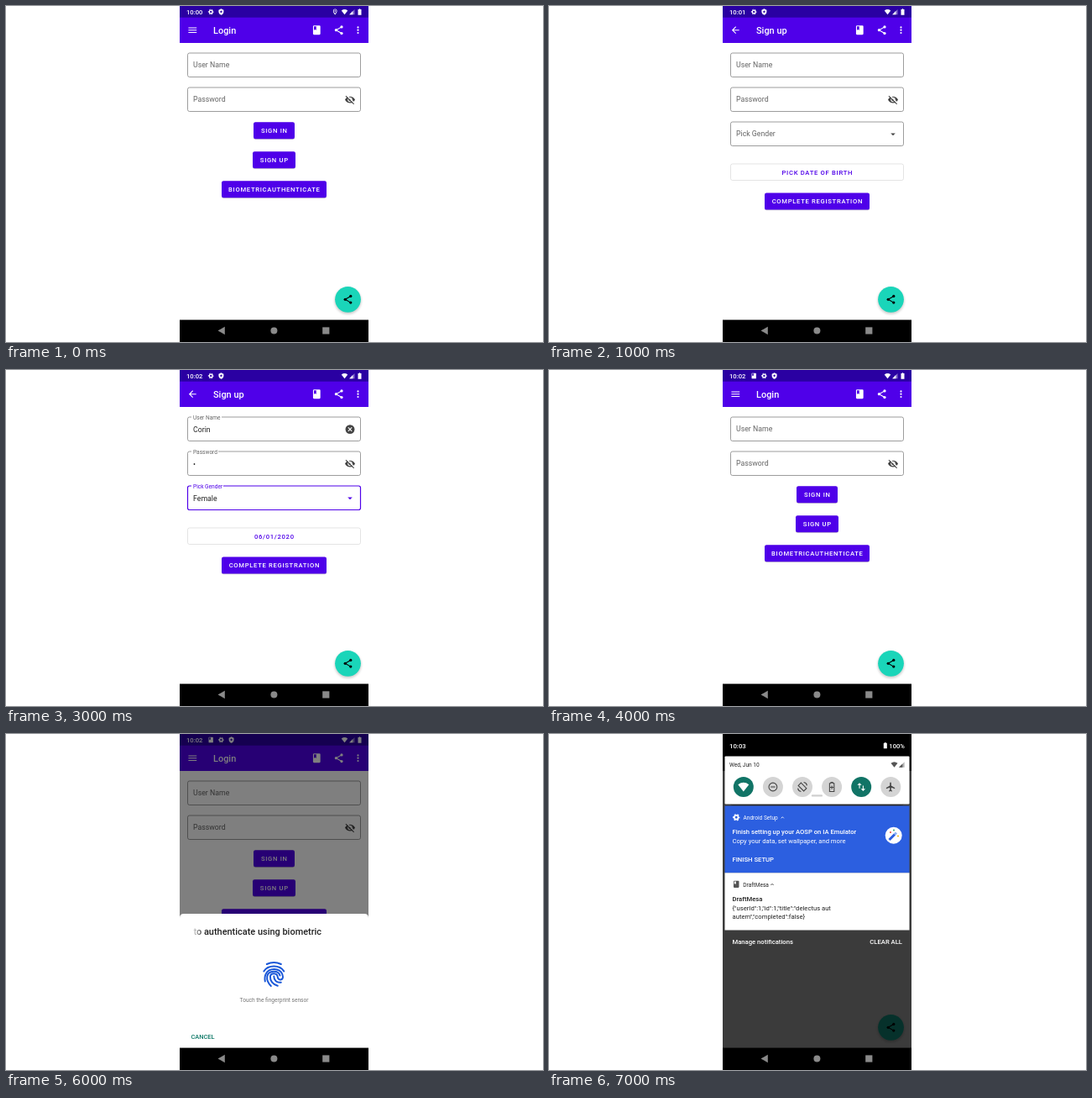
These frames come from a looping animation (640x400 px, 8000 ms). An HTML page:

```html
<!DOCTYPE html>
<html lang="en">
<head>
<meta charset="utf-8">
<title>App walkthrough</title>
<style>
html, body { margin: 0; width: 100%; height: 100%; overflow: hidden; background: #fff; }
svg { display: block; width: 100vw; height: 100vh; font-family: Roboto, sans-serif; }
text { white-space: pre; }
</style>
</head>
<body>
<svg id="stage" viewBox="0 0 640 400"></svg>
<script>
const PURPLE = '#4f00e9', DARK = '#2a00a2', TEAL = '#1ad5b9', GREEN = '#0c7866';
const INK = '#222', GREY = '#666';
const USER = 'Corin', APP = 'DraftMesa';
const stage = document.getElementById('stage');

// Icons live in a 24 x 24 box and use currentColor.
const ICONS = {
  menu: '<path d="M3 6h18v2H3zM3 11h18v2H3zM3 16h18v2H3z"/>',
  back: '<path d="M20 11H7.8l5.6-5.6L12 4l-8 8 8 8 1.4-1.4L7.8 13H20z"/>',
  book: '<path fill-rule="evenodd" d="M6 2h12q2 0 2 2v16q0 2-2 2H6q-2 0-2-2V4q0-2 2-2zM6 4v8l2.5-1.5L11 12V4z"/>',
  share: '<path d="M18 5L6 12l12 7" fill="none" stroke="currentColor" stroke-width="2"/><circle cx="18" cy="5" r="3"/><circle cx="6" cy="12" r="3"/><circle cx="18" cy="19" r="3"/>',
  more: '<circle cx="12" cy="6" r="2"/><circle cx="12" cy="12" r="2"/><circle cx="12" cy="18" r="2"/>',
  gear: '<g fill="none" stroke="currentColor"><circle cx="12" cy="12" r="5.6" stroke-width="4.2"/><circle cx="12" cy="12" r="8.6" stroke-width="3" pathLength="12" stroke-dasharray="1.1 .9" stroke-dashoffset=".55"/></g>',
  shield: '<path fill-rule="evenodd" d="M12 1l9 4v6c0 6-4 10-9 12-5-2-9-6-9-12V5zM12 6l-1.5 4H7l3 2.500-1 4 3-2.300 3 2.300-1-4 3-2.500h-3.500z"/>',
  pin: '<path fill-rule="evenodd" d="M12 1C7.500 1 4.500 4.500 4.500 8.500 4.500 14 12 23 12 23s7.500-9 7.500-14.500C19.500 4.500 16.500 1 12 1zM12 3.500c3 0 5 2 5 5 0 3-3 7-5 10-2-3-5-7-5-10 0-3 2-5 5-5z"/><circle cx="12" cy="8.500" r="2.500"/>',
  wifi: '<path d="M12 22L0 7Q12-2 24 7z"/>',
  signal: '<path d="M2 22L22 2v20z" opacity=".45"/><path d="M2 22L15 9v13z"/>',
  battery: '<path d="M10 1h4v2h4v20H6V3h4z"/>',
  eyeOff: '<path fill-rule="evenodd" d="M1 12C5 2.500 19 2.500 23 12 19 21.500 5 21.500 1 12zM7 12a5 5 0 0 0 10 0 5 5 0 0 0-10 0z"/><circle cx="12" cy="12" r="3"/><path d="M4.500 2.200L22.500 20.200" stroke="#fff" stroke-width="2.400"/><path d="M2.700 3.700L20.500 21.500" stroke="currentColor" stroke-width="1.900"/>',
  clear: '<circle cx="12" cy="12" r="10"/><path d="M8 8l8 8M16 8l-8 8" stroke="#fff" stroke-width="2"/>',
  down: '<path d="M7 10l5 5 5-5z"/>',
  edit: '<path d="M3 17.200V21h3.800L17.800 9.900l-3.700-3.700zM20.700 7c.4-.4.4-1 0-1.400l-2.300-2.300c-.4-.4-1-.4-1.400 0l-1.800 1.800 3.700 3.700z"/>',
  left: '<path d="M15 6l-6 6 6 6" fill="none" stroke="currentColor" stroke-width="2.400"/>',
  right: '<path d="M9 6l6 6-6 6" fill="none" stroke="currentColor" stroke-width="2.400"/>',
  up: '<path d="M6 15l6-6 6 6" fill="none" stroke="currentColor" stroke-width="3"/>',
  dnd: '<circle cx="12" cy="12" r="9" fill="none" stroke="currentColor" stroke-width="2"/><path d="M7 11h10v2H7z"/>',
  rotate: '<g fill="none" stroke="currentColor" stroke-width="2"><path d="M9 3l12 12-6 6L3 9zM15 2q6 1 7 7M9 22q-6-1-7-7"/></g>',
  saver: '<path d="M10 2h4v2h3v18H7V4h3z" fill="none" stroke="currentColor" stroke-width="2"/><path d="M11 9h2v3h3v2h-3v3h-2v-3H8v-2h3z"/>',
  data: '<path d="M8 3l5 5H9v7H7V8H3zM16 21l-5-5h4V9h2v7h4z"/>',
  plane: '<path d="M21 16v-2l-8-5V3.500a1.500 1.500 0 0 0-3 0V9l-8 5v2l8-2.500V19l-2 1.500V22l3.500-1 3.500 1v-1.500L13 19v-5.500z"/>'
};

const icon = (name, cx, cy, size, color) =>
  `<g transform="translate(${cx - size / 2} ${cy - size / 2}) scale(${size / 24})" fill="${color}" color="${color}">${ICONS[name]}</g>`;

const rect = (x, y, w, h, fill, r = 0, extra = '') =>
  `<rect x="${x}" y="${y}" width="${w}" height="${h}" rx="${r}" fill="${fill}" ${extra}/>`;

const disc = (cx, cy, r, fill, extra = '') =>
  `<circle cx="${cx}" cy="${cy}" r="${r}" fill="${fill}" ${extra}/>`;

function text(str, x, y, size, fill, { w = 400, at = 'start', ls = 0 } = {}) {
  return `<text x="${x}" y="${y}" font-size="${size}" fill="${fill}" font-weight="${w}" text-anchor="${at}" letter-spacing="${ls}">${str}</text>`;
}

const caps = (str, x, y, fill, at = 'middle') =>
  text(str, x + (at === 'middle' ? .34 : 0), y, 7.66, fill, { w: 500, at, ls: .68 });

function statusIcons({ clock, note, pin }) {
  const left = [...(note ? ['book'] : []), 'gear', 'shield'];
  return text(clock, 215, 10, 7.66, '#fff', { w: 500 }) +
    left.map((n, i) => icon(n, 244.2 + i * 12.2, 7, 8, '#fff')).join('') +
    (pin ? icon('pin', 392.2, 7, 7.5, '#fff') : '') +
    icon('wifi', 403.5, 7, 7.5, '#fff') +
    icon('signal', 412.3, 7, 7.5, '#fff') +
    icon('battery', 421.5, 7, 8, '#fff');
}

function appBar(title, nav) {
  return rect(207, 0, 225, 14, DARK) + rect(207, 13.7, 225, 30.3, PURPLE) +
    icon(nav, 222.300, 28.700, 13.1, '#fff') +
    text(title, 247, 33, 10.95, '#fff', { w: 500 }) +
    icon('book', 370.3, 28.700, 13.1, '#fff') +
    icon('share', 396.7, 28.700, 13.1, '#fff') +
    icon('more', 419.5, 28.700, 13.1, '#fff');
}

function field(y, label, value, trail, focus, labelWidth) {
  const line = focus || '#858585';
  let out = rect(216.5, y, 206, 28.5, '#fff', 2.2, `stroke="${line}" stroke-width="${focus ? 1.2 : .8}"`);
  if (value) {
    out += rect(221, y - 1, labelWidth, 2, '#fff') +
      text(label, 223, y + 2.9, 6.57, focus ? PURPLE : GREY) +
      text(value, 223, y + 17.7, 8.76, INK);
  } else {
    out += text(label, 223, y + 17.4, 8.76, GREY);
  }
  return out + (trail ? icon(trail, 410, y + 14.6, 13.1, focus && trail === 'down' ? focus : '#444') : '');
}

function button(label, x, y, w, on = true) {
  return (on ? rect(x, y + .5, w, 20.2, '#000', 2.2, 'opacity=".2"') : '') +
    rect(x, y, w, 20, on ? PURPLE : '#d9d9d9', 2.2) +
    caps(label, x + w / 2, y + 12.8, on ? '#fff' : '#888');
}

function fab() {
  return disc(407.5, 351, 15.8, '#000', 'opacity=".2" filter="url(#soft)"') +
    disc(407.5, 349.3, 15.4, TEAL) + icon('share', 407.5, 349.3, 13.1, '#000');
}

function loginPage({ user, pass, bio }) {
  return appBar('Login', 'menu') +
    field(56, 'User Name', user, user && 'clear', null, 36) +
    field(97, 'Password', pass, 'eyeOff', pass && '#2470c2', 32) +
    button('SIGN IN', 295, 138.2, 49) +
    button('SIGN UP', 294, 173.2, 51) +
    button('BIOMETRICAUTHENTICATE', 257, 208.2, 125, bio) + fab();
}

function signUpPage({ user, pass, gender, date }) {
  return appBar('Sign up', 'back') +
    field(56, 'User Name', user, user && 'clear', null, 36) +
    field(97, 'Password', pass, 'eyeOff', null, 32) +
    field(138, 'Pick Gender', gender, 'down', gender && PURPLE, 38) +
    rect(216.5, 188, 206, 19.5, '#fff', 2.2, 'stroke="#d8d8d8" stroke-width=".7"') +
    caps(date, 319.5, 200.7, PURPLE) +
    button('COMPLETE REGISTRATION', 257, 222.6, 125) + fab();
}

const scrim = a => rect(207, 0, 225, 374, '#000', 0, `opacity="${a}"`);

function navBar() {
  return rect(207, 373.6, 225, 26.4, '#000') +
    '<path d="M252.500 386.500l8.300-4.700v9.400z" fill="#8a8a8a"/>' +
    disc(319.4, 386.5, 4, '#8a8a8a') + rect(377.2, 382.4, 8.2, 8.2, '#8a8a8a');
}

function datePicker() {
  const col = i => 248 + i * 23.67, row = i => 185 + i * 21.85;
  let out = rect(230.5, 55, 178, 280, '#000', 2, 'opacity=".35" filter="url(#soft)"') +
    rect(230.5, 53.7, 178, 279.8, '#fff', 2) +
    rect(230.5, 53.7, 178, 8, PURPLE, 2) + rect(230.5, 56, 178, 63, PURPLE) +
    text('PICK DATE OF BIRTH', 244, 69, 5.47, '#fff', { ls: .91 }) +
    text('Jun 1, 2020', 243.7, 108.2, 18.6, '#fff', { ls: .13 }) +
    icon('edit', 389, 101.5, 13.1, '#fff') +
    caps('JUNE, 2020', 241.7, 137, PURPLE, 'start') +
    icon('down', 296.7, 134.2, 13.1, PURPLE) +
    icon('left', 360.5, 134.2, 13.1, PURPLE) + icon('right', 386.5, 134.2, 13.1, PURPLE) +
    disc(271.6, 182.6, 10, PURPLE) +
    disc(342.6, 204.4, 9.8, 'none', 'stroke="#222" stroke-width=".9"');
  [...'SMTWTFS'].forEach((d, i) => {
    out += text(d, col(i), 163.5, 7.1, INK, { at: 'middle' });
  });
  for (let d = 1; d <= 30; d++) {
    out += text(d, col(d % 7), row(Math.floor(d / 7)), 6.57, d === 1 ? '#fff' : INK, { at: 'middle', ls: .1 });
  }
  return out + caps('CANCEL', 344, 322, PURPLE) + caps('OK', 386.500, 322, PURPLE);
}

function fingerprint() {
  return `<g transform="translate(319.3 286)" fill="none" stroke="#1b58d8" stroke-width="2" stroke-linecap="round">
    <path d="M-8.500-12Q0-16 8.500-12M-12-3.500C-7-11.500 7-11.500 12-3.500"/>
    <path d="M-10.500 8.500Q-11.500 3-9.500-.500C-6-8 7-8 10 0Q11 3 10.500 4.500C9 8 4.600 6.500 4.400 3 4-1.800-3.600-2.200-4.400 2.400-4.800 8-1 12.500 4.500 13.800"/>
    <path d="M-3.500 14C-7 10.500-8.500 6-8 2.500-6.500-5 5.500-5 7.200 1.500M0 2.600C0 7.600 3.500 10.500 8.500 9.700"/></g>`;
}

function bioSheet() {
  return '<path d="M207 374V219q0-5 5-5h215q5 0 5 5v155z" fill="#fff"/>' +
    text('to authenticate using biometric', 223.5, 239, 10.95, 'url(#fade)', { w: 500 }) +
    fingerprint() +
    text('Touch the fingerprint sensor', 319.5, 319.300, 6.57, '#777', { at: 'middle' }) +
    text('CANCEL', 220.5, 363, 7.4, GREEN, { w: 500 });
}

function shade() {
  const tiles = ['wifi', 'dnd', 'rotate', 'saver', 'data', 'plane'];
  const white = '#fff', bold = { w: 500 };
  return rect(207, 0, 225, 44, '#000') +
    text('10:03', 215, 16.500, 7.8, white, bold) +
    icon('battery', 400.8, 13.7, 8, white) + text('100%', 405.3, 16.500, 7.66, white, bold) +
    rect(209.5, 26.5, 220, 57, white, 1) +
    text('Wed, Jun 10', 215, 38.5, 6.57, INK) +
    icon('wifi', 411.5, 36.5, 8, '#555') + icon('signal', 420.3, 36.5, 8, '#555') +
    rect(312.8, 72.3, 13.2, 2.2, '#cfcfcf', 1) +
    tiles.map((n, i) => {
      const on = i === 0 || i === 4, x = 231.8 + i * 35.1;
      return disc(x, 63, 12, on ? '#117466' : '#d4d4d4') + icon(n, x, 63, 13, on ? white : '#444');
    }).join('') +
    rect(209.5, 85.5, 220, 80, '#2c5fe0') +
    icon('gear', 223.2, 99.3, 10, white) +
    text('Android Setup', 231.5, 101.8, 6.57, white) + icon('up', 278.3, 99.5, 6.5, white) +
    text('Finish setting up your AOSP on IA Emulator', 218.5, 119, 7.66, white, bold) +
    text('Copy your data, set wallpaper, and more', 218.5, 130, 7.66, white) +
    text('FINISH SETUP', 218.5, 151.6, 7.66, white, bold) +
    disc(410.7, 120.8, 10, white) +
    '<path d="M405.500 126l6.500-6.500" stroke="#2c5fe0" stroke-width="3"/><path d="M412 119.500l2-2" stroke="#8ab0f5" stroke-width="3"/>' +
    disc(407, 117, 1, '#e84a3c') + disc(416, 121.500, 1, '#f4b400') + disc(411, 114.500, .9, '#22a060') +
    rect(209.5, 165.3, 220, 68.2, white) +
    icon('book', 223.2, 178.8, 9.8, '#555') +
    text(APP, 231.3, 181.5, 6.57, INK) + icon('up', 266, 179.2, 6.5, INK) +
    text(APP, 218.5, 198.7, 7.66, INK, bold) +
    text('{"userId":1,"id":1,"title":"delectus aut', 218.5, 209.5, 7.66, INK) +
    text('autem","completed":false}', 218.5, 220.3, 7.66, INK) +
    text('Manage notifications', 218.5, 249.6, 7.66, white, bold) +
    text('CLEAR ALL', 421, 249.6, 7.66, white, { w: 500, at: 'end' });
}

const filled = { user: USER, pass: '•', gender: 'Female', date: '06/01/2020' };
const scenes = [
  () => loginPage({}) + statusIcons({ clock: '10:00', pin: true }),
  () => signUpPage({ date: 'PICK DATE OF BIRTH' }) + statusIcons({ clock: '10:01' }),
  () => signUpPage(filled) + scrim(.6) + statusIcons({ clock: '10:02' }) + datePicker(),
  () => signUpPage(filled) + statusIcons({ clock: '10:02' }),
  () => loginPage({ bio: true }) + statusIcons({ clock: '10:02', note: true }),
  () => loginPage({ user: USER, pass: '••••••' }) + statusIcons({ clock: '10:01' }),
  () => loginPage({ bio: true }) + statusIcons({ clock: '10:02', note: true }) + scrim(.5) + bioSheet(),
  () => loginPage({}) + scrim(.77) + shade()
];

const defs = `<defs><filter id="soft" x="-30%" y="-30%" width="160%" height="160%"><feGaussianBlur stdDeviation="1.6"/></filter>
  <linearGradient id="fade" gradientUnits="userSpaceOnUse" x1="221" y1="0" x2="235" y2="0"><stop stop-color="#222" stop-opacity="0"/><stop offset="1" stop-color="#222"/></linearGradient></defs>`;

let shown = -1;
function draw(ms) {
  const i = Math.floor(ms % 8000 / 1000);
  if (i === shown) return;
  shown = i;
  stage.innerHTML = defs + rect(0, 0, 640, 400, '#fff') + scenes[i]() + navBar();
}

const start = performance.now();
function tick() {
  draw(performance.now() - start);
  requestAnimationFrame(tick);
}
tick();
</script>
</body>
</html>
```
